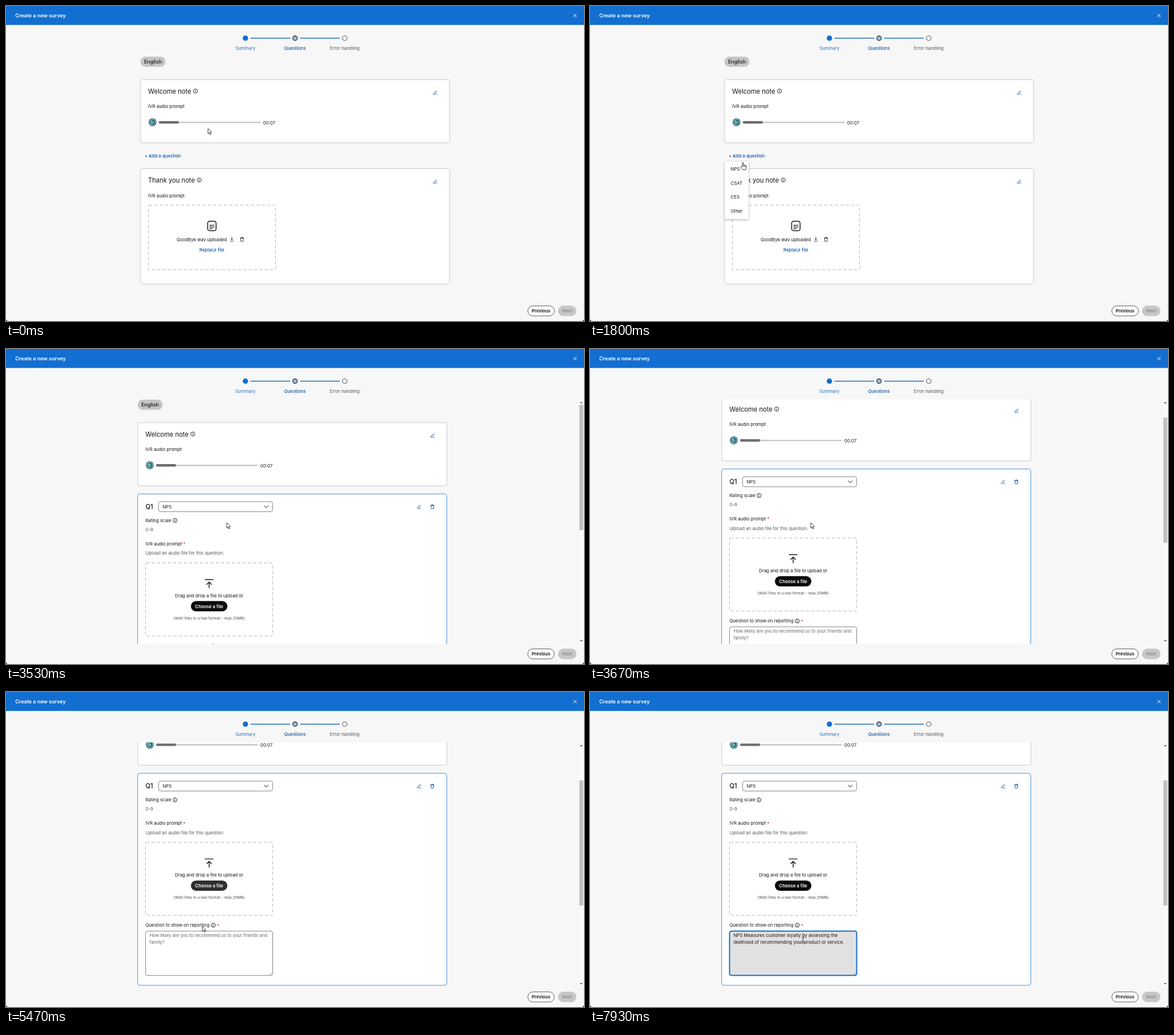
Write an HTML page that moves like this. It is 1013 px wide and 553 px high and loops after 8 s.

```html
<!DOCTYPE html>
<html lang="en">
<head>
<meta charset="utf-8">
<title>Create a new survey</title>
<style>
html, body { margin: 0; width: 100%; height: 100%; overflow: hidden; background: #f7f7f7; }
svg { display: block; width: 1013px; height: 553px; }
text { font-family: Inter, "Open Sans", sans-serif; white-space: pre; }
</style>
</head>
<body>
<svg id="stage" viewBox="0 0 1013 553" xmlns="http://www.w3.org/2000/svg"></svg>
<script>
const LOOP = 8000, MAX_SCROLL = 111.7;
const BLUE = '#126fd1', LINK = '#0f549d', INK = '#141414', GREY = '#575757';
const BODY = 7.84, TITLE = 11.2, MID = 8.96;

// cy is the middle of the capitals
function text(x, cy, str, { size = BODY, fill = INK, weight = 400, anchor = 'start', id = '' } = {}) {
  const y = (cy + size * 0.364).toFixed(2);
  return `<text ${id && `id="${id}"`} x="${x}" y="${y}" font-size="${size}" font-weight="${weight}" fill="${fill}" text-anchor="${anchor}">${str}</text>`;
}
function box(x, y, w, h, r, fill, stroke = 'none', extra = '') {
  return `<rect x="${x}" y="${y}" width="${w}" height="${h}" rx="${r}" fill="${fill}" stroke="${stroke}" ${extra}/>`;
}
function line(d, color, width = 0.9, x = 0, y = 0) {
  return `<path transform="translate(${x} ${y})" d="${d}" fill="none" stroke="${color}" stroke-width="${width}" stroke-linecap="round" stroke-linejoin="round"/>`;
}
function dot(x, y, r, fill, stroke = 'none', width = 1) {
  return `<circle cx="${x}" cy="${y}" r="${r}" fill="${fill}" stroke="${stroke}" stroke-width="${width}"/>`;
}
const info = (x, y) => dot(x, y, 3.6, 'none', INK, 0.9) + line('M0-.2V1.8M0-1.8V-1.6', INK, 0.9, x, y);
const pencil = (x, y) => line('M-2.8 2.9L-2.3.8L1.5-3L3-1.5L-.8 2.4ZM.6 3.1H3.1', LINK, 0.85, x, y);
const trash = (x, y, color) =>
  line('M-3-2.2H3M-1.3-2.2V-3.4H1.3V-2.2M-2.4-2.2V2.4Q-2.4 3.5-1.3 3.5H1.3Q2.4 3.5 2.4 2.4V-2.2', color, 0.95, x, y);
const dashed = (x, y, w, h) =>
  box(x, y, w, h, 1, 'none', '#b4b4b4', 'stroke-dasharray="5.6 3.8"');

function header() {
  return box(0, 0, 1013, 33.3, 0, BLUE)
    + text(16.2, 17, 'Create a new survey', { size: MID, weight: 600, fill: '#fff' })
    + line('M-2.6-2.6L2.6 2.6M2.6-2.6L-2.6 2.6', '#fff', 1, 997.3, 16.8);
}

function stepper() {
  const label = { anchor: 'middle' };
  return line('M429 56.5H497.5M516 56.5H584.5', '#1c68b5', 1.3)
    + dot(419.6, 56.5, 4.7, BLUE)
    + dot(506.6, 56.5, 4, '#a9b9c9', '#1d3855', 1.3)
    + dot(593.7, 56.5, 4, '#fff', '#606060', 1.2)
    + text(419.5, 74.3, 'Summary', { ...label, fill: '#2873c2' })
    + text(506.5, 74.3, 'Questions', { ...label, fill: LINK, weight: 500 })
    + text(593.6, 74.3, 'Error handling', { ...label, fill: GREY });
}

function footer() {
  return box(914.5, 526.5, 46.5, 17.6, 8.8, '#fff', '#4a4a4a', 'stroke-width=".9"')
    + text(937.7, 535.6, 'Previous', { anchor: 'middle', weight: 600 })
    + box(967.5, 526, 32.2, 18.4, 9.2, '#c7c7c7')
    + text(983.6, 535.6, 'Next', { anchor: 'middle', weight: 600, fill: '#8d8d8d' })
    + '<path d="M0 549V553H4Q0 553 0 549ZM1013 549V553H1009Q1013 553 1013 549Z" fill="#000"/>';
}

function welcome() {
  return box(235.5, 88.8, 44, 18, 9, '#c5c5c5')
    + text(257.5, 98, 'English', { size: MID, weight: 500, anchor: 'middle' })
    + box(235.8, 129.2, 541.8, 111, 4, '#fff', '#c9c9c9')
    + text(249, 149.6, 'Welcome note', { size: TITLE })
    + info(332, 149.2) + pencil(752.2, 152)
    + text(249, 176.4, 'IVR audio prompt')
    + dot(256.8, 204.2, 6.9, '#125e6b') + dot(256.8, 204.2, 5.2, 'none', '#fff', 0.9)
    + line('M-1.6-2.5L2.4 0L-1.6 2.5Z', '#fff', 1, 256.8, 204.2)
    + box(268, 203.2, 178.5, 2.3, 1.1, '#c4c4c4')
    + box(268, 202.1, 34.6, 4.4, 1.4, '#6d6d6d')
    + text(450.6, 204.8, '00:07');
}

function thanks() {
  return text(242.8, 263.6, '+ Add a question', { weight: 500, fill: LINK, id: 'add' })
    + box(235.8, 285.5, 541.8, 202.6, 4, '#fff', '#c9c9c9')
    + text(249, 305.9, 'Thank you note', { size: TITLE })
    + info(338.7, 305.4) + pencil(752.2, 308.2)
    + text(249, 332.7, 'IVR audio prompt')
    + dashed(249.6, 349.6, 223, 113.2)
    + box(353.4, 377.8, 14.8, 16.8, 3.6, '#fff', INK, 'stroke-width="1.5"')
    + line('M356.8 384.8H364.8M356.8 387.8H364.8M356.8 390.8H361.6', INK, 1.2)
    + text(299, 409.7, 'GoodBye.wav uploaded')
    + line('M0-3.6V1.4M-1.9-.4L0 1.5L1.9-.4M-2.9 3.6H2.9', '#333', 0.9, 395.8, 409.4)
    + trash(413.6, 409.6, '#222')
    + text(360.8, 428.2, 'Replace file', { anchor: 'middle', weight: 500, fill: LINK });
}

function menu() {
  const items = ['NPS', 'CSAT', 'CES', 'Other'];
  return '<g id="menu">'
    + box(235.8, 272.3, 42.4, 102, 2, '#fff', '#d4d4d4', 'stroke-width=".6" filter="url(#shade)"')
    + '<rect id="pick" x="238" y="274.5" width="38" height="24" fill="#f0f0f0"/>'
    + items.map((s, i) => text(246.6, 286.5 + i * 24.55, s)).join('')
    + '</g>';
}

function question() {
  const star = (x, y) => text(x, y, '*', { fill: '#c0202c' });
  const mid = { anchor: 'middle' };
  return box(230.7, 254.4, 541.8, 372.2, 4, '#fff', '#4a8fd6')
    + text(244.5, 277, 'Q1', { size: TITLE, weight: 500 })
    + box(267.4, 268, 200, 17.6, 3.6, '#fff', '#767676', 'stroke-width=".9"')
    + text(274.4, 277, 'NPS')
    + line('M-3.6-1.7L0 1.9L3.6-1.7', INK, 1, 456, 276.8)
    + pencil(723.8, 277) + trash(747.2, 277, LINK)
    + text(244.5, 301, 'Rating scale') + info(296.2, 301)
    + text(244.5, 317.2, '0-9', { fill: GREY })
    + text(244.5, 342.2, 'IVR audio prompt') + star(310.4, 342.4)
    + text(244.5, 358.5, 'Upload an audio file for this question.', { fill: GREY })
    + dashed(244.6, 375.5, 222.8, 128.2)
    + line('M-7-7.2H7M0 7.2V-2.8M-4.2 1.2L0-3L4.2 1.2', INK, 1.4, 356, 412)
    + text(356, 432.9, 'Drag and drop a file to upload or', mid)
    + '<rect id="choose" x="324" y="442.6" width="64" height="18" rx="9"/>'
    + text(356, 452.1, 'Choose a file', { ...mid, weight: 600, fill: '#fff' })
    + text(356, 472.2, '(WAV files in u-law format - max 25MB)', { ...mid, size: 6.7, fill: '#484848' })
    + text(244.5, 521.3, 'Question to show on reporting') + info(363.2, 521.2) + star(370, 521.5)
    + '<rect id="area" x="244.6" y="531.5" width="222.8" height="77.8" rx="3.4"/>'
    + line('M462.5 608L466.3 604.2M464.8 608L466.3 606.5', '#777', 0.6)
    + '<g id="hint">'
    + text(251.5, 539.2, 'How likely are you to recommend us to your friends and', { fill: '#666' })
    + text(251.5, 550.8, 'family?', { fill: '#666' }) + '</g><g id="answer">'
    + text(251.5, 539.2, 'NPS Measures customer loyalty by assessing the')
    + text(251.5, 550.8, 'likelihood of recommending your product or service.') + '</g>'
    + '<rect id="caret" width=".8" height="9.6" fill="#111"/>';
}

function scrollbar() {
  return '<g id="bar">' + box(1004, 89, 9, 428.5, 0, '#fafafa')
    + '<path d="M1005.8 95.2L1008.2 92.4L1010.6 95.2ZM1005.8 511L1008.2 513.8L1010.6 511Z" fill="#555"/>'
    + '<rect id="thumb" x="1004.8" y="98" width="7" height="220" fill="#c1c1c1"/></g>';
}

function pointers() {
  const skin = 'fill="#fff" stroke="#111" stroke-width=".8" stroke-linejoin="round"';
  return '<g id="cursor">'
    + `<path id="arrow" d="M0 0V9.4L2.2 7.4L3.7 10.8L5.2 10.1L3.7 6.9H6.6Z" ${skin}/>`
    + `<path id="hand" d="M-1 8V1A1 1 0 0 1 1 1V5A1 .9 0 0 1 2.8 5.2A1 .9 0 0 1 4.5 5.8A.9.9 0 0 1 5.9 6.6V9.6L4.9 13H0L-3.4 8.5A1 1 0 0 1-1.9 7.2ZM1 5V7.5M2.8 5.4V7.7M4.5 6V8" ${skin}/>`
    + '<path id="beam" d="M-1.9-5Q0-5 0-4Q0-5 1.9-5M0-4V4M-1.9 5Q0 5 0 4Q0 5 1.9 5" fill="none" stroke="#222" stroke-width=".9"/>'
    + '</g>';
}

document.getElementById('stage').innerHTML =
  `<defs><clipPath id="view"><rect x="0" y="88.6" width="1013" height="429"/></clipPath>
  <filter id="shade" x="-20%" y="-20%" width="140%" height="140%"><feDropShadow dx="0" dy="1.2" stdDeviation="1.6" flood-opacity=".28"/></filter></defs>`
  + box(0, 0, 1013, 553, 0, '#f7f7f7') + header() + stepper()
  + `<g clip-path="url(#view)"><g id="page"><g id="top">${welcome()}</g><g id="first">${thanks()}</g><g id="second">${question()}</g></g></g>`
  + scrollbar() + menu() + footer() + pointers();

const el = {};
document.querySelectorAll('#stage [id]').forEach(n => { el[n.id] = n; });

// time, x, y
const PATH = [
  [70, 354, 215], [670, 286, 264], [1470, 286, 264], [1800, 268, 274.5], [2000, 257, 285],
  [2800, 257, 286], [3500, 387, 305], [3860, 387, 305], [4130, 376, 319], [4470, 371, 335],
  [4520, 371, 335], [4530, 363, 335], [5465, 363, 335], [5470, 344, 411], [6270, 272, 451],
  [6330, 272, 451], [6520, 257, 436], [6800, 269.5, 448], [7590, 269.5, 448], [7730, 373.5, 448],
  [7860, 373.5, 448], [7930, 373.5, 435.8]
];
// time from which each pointer shape holds
const SHAPES = [
  [0, 'arrow'], [540, 'hand'], [2330, 'arrow'], [4070, 'beam'], [4200, 'arrow'],
  [4330, 'hand'], [5470, 'arrow'], [5740, 'beam']
];

const clamp = v => Math.min(1, Math.max(0, v));
const ease = p => p * p * (3 - 2 * p);
const show = (node, on) => node.setAttribute('visibility', on ? 'visible' : 'hidden');
function set(node, attrs) {
  for (const k in attrs) node.setAttribute(k, attrs[k]);
}

function pointerAt(t) {
  const i = PATH.findIndex(k => k[0] > t);
  if (i === 0) return PATH[0].slice(1);
  if (i < 0) return PATH[PATH.length - 1].slice(1);
  const [t0, x0, y0] = PATH[i - 1], [t1, x1, y1] = PATH[i];
  const p = ease((t - t0) / (t1 - t0));
  return [x0 + (x1 - x0) * p, y0 + (y1 - y0) * p];
}

function render(t) {
  const asked = t >= 2265;
  const scroll = MAX_SCROLL * ease(clamp((t - 3530) / 330));
  set(el.page, { transform: `translate(0 ${-scroll})` });
  set(el.top, { transform: `translate(${asked ? -4.8 : 0} 0)` });
  el.first.style.display = asked ? 'none' : '';
  el.second.style.display = asked ? '' : 'none';
  el.bar.style.display = asked ? '' : 'none';
  set(el.thumb, { y: 98 + scroll * 0.511 });

  set(el.add, { fill: t >= 540 && t < 900 ? '#0a3668' : LINK });
  el.menu.style.display = t >= 870 && t < 2200 ? '' : 'none';
  set(el.menu, { opacity: clamp((t - 830) / 150) });
  el.pick.style.display = t >= 1870 ? '' : 'none';

  set(el.choose, { fill: t >= 4330 && t < 5520 ? '#2f2f2f' : '#0a0a0a' });
  const hover = t >= 5740, focus = t >= 6200, pasted = t >= 7200;
  set(el.area, {
    fill: hover ? '#e1e1e1' : '#fff',
    stroke: focus ? '#1b6fc6' : '#767676',
    'stroke-width': focus ? 2 : 0.9
  });
  el.hint.style.display = pasted ? 'none' : '';
  el.answer.style.display = pasted ? '' : 'none';
  el.caret.style.display = (focus && t < 7000) || (pasted && t < 7700) ? '' : 'none';
  set(el.caret, pasted ? { x: 443.6, y: 546 } : { x: 251.6, y: 534.2 });

  const [x, y] = pointerAt(t);
  set(el.cursor, { transform: `translate(${x} ${y})` });
  const shape = SHAPES.filter(s => s[0] <= t).pop()[1];
  for (const name of ['arrow', 'hand', 'beam']) show(el[name], name === shape);
}

const start = performance.now();
function tick() {
  render((performance.now() - start) % LOOP);
  requestAnimationFrame(tick);
}
render(0);
requestAnimationFrame(tick);
</script>
</body>
</html>
```
